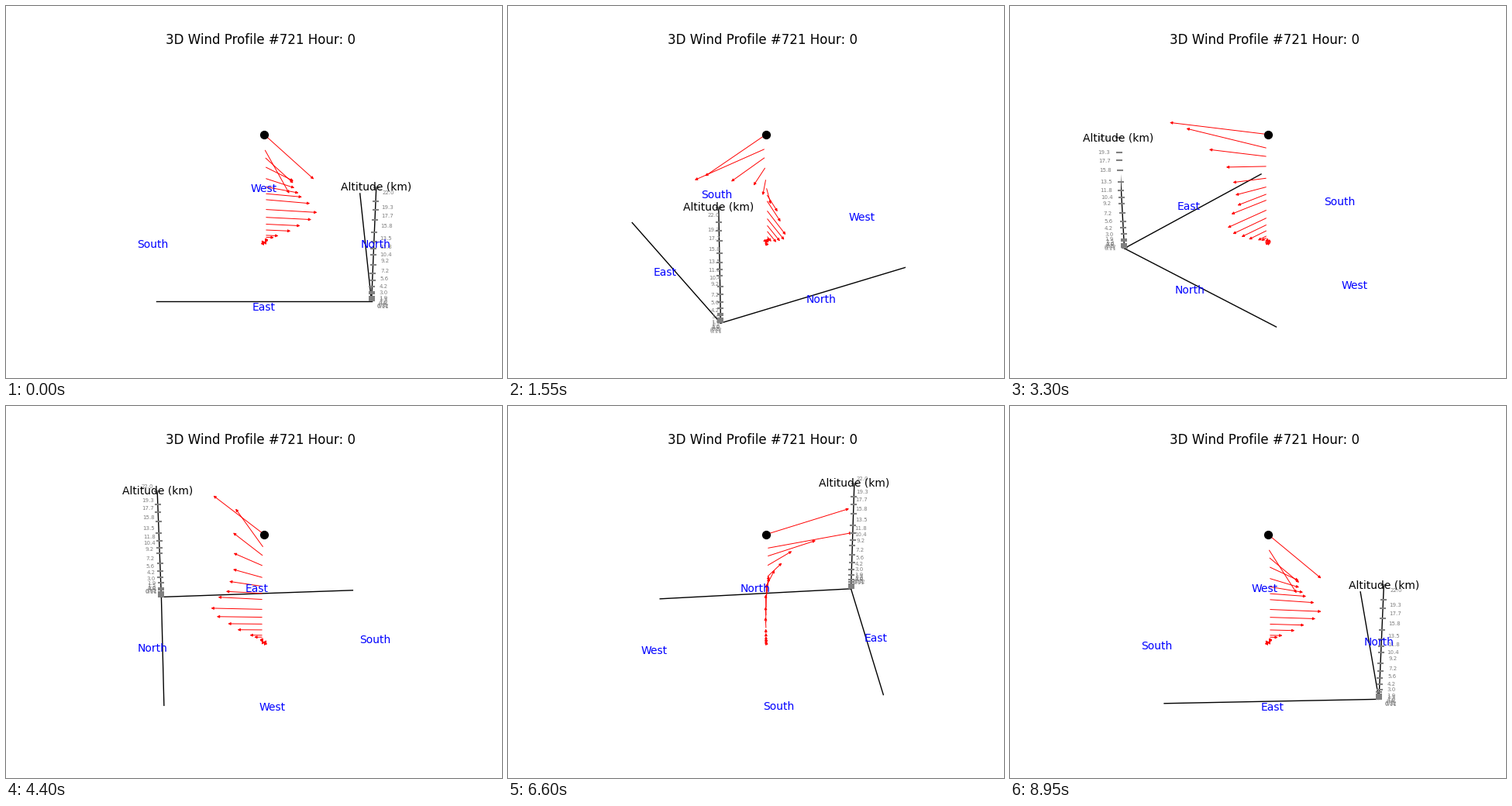
These frames come from a looping animation (640x480 px, 9 s). A matplotlib script:

```python
import numpy as np
import matplotlib.pyplot as plt
from matplotlib.animation import FuncAnimation
from matplotlib.patches import FancyArrowPatch

FRAMES, INTERVAL = 180, 50
ELEV = np.radians(30)
DIST = 10
EDGE = 0.668           # half width of the ground square
LABEL = 1.1 * EDGE     # where labels sit
Z0, KM = -0.414, 0.03727

# altitudes (km) of the standard pressure levels
LEVELS = np.array([0.11, 0.32, 0.5, 0.8, 1.0, 1.5, 1.9, 3.0, 4.2, 5.6,
                   7.2, 9.2, 10.4, 11.8, 13.5, 15.8, 17.7, 19.3, 22.0])
TOP = LEVELS[-1]


def profile(*points):
    """Wind at every level, linear between (km, speed) key points."""
    return np.interp(LEVELS, *zip(*points))


east = profile((0, -0.003), (9.2, 0.053), (10.4, 0.047), (15.8, 0.202),
               (17.7, 0.358), (19.3, 0.593), (22, 0.591))
north = profile((0, -0.03), (3, 0.188), (5.6, 0.322), (7.2, 0.358),
                (9.2, 0.31), (10.4, 0.258), (13.5, 0.206), (17.7, 0.19),
                (19.3, 0.158), (22, 0.308))

COMPASS = {"North": (0, LABEL), "South": (0, -LABEL),
           "East": (LABEL, 0), "West": (-LABEL, 0)}


def project(x, y, km, azim):
    """Perspective view of a point; returns screen x, y."""
    z = Z0 + KM * km
    right = y * np.cos(azim) - x * np.sin(azim)
    near = x * np.cos(azim) + y * np.sin(azim)
    depth = DIST - near * np.cos(ELEV) - z * np.sin(ELEV)
    up = z * np.cos(ELEV) - near * np.sin(ELEV)
    return right / depth, up / depth


fig = plt.figure(figsize=(6.4, 4.8), dpi=100)
ax = fig.add_axes([143.2 / 640, 0.11, 369.6 / 640, 0.77])
ax.set(xlim=(-0.095, 0.09), ylim=(-0.095, 0.09))
ax.axis("off")
ax.set_title("3D Wind Profile #721 Hour: 0")


def label(text, color, size):
    return ax.text(0, 0, text, color=color, fontsize=size,
                   ha="center", va="center", zorder=5)


def arrow():
    patch = FancyArrowPatch((0, 0), (0.01, 0), arrowstyle="-|>",
                            mutation_scale=5, lw=0.7, color="red", zorder=3)
    return ax.add_patch(patch)


# ends of the three axis lines, all starting from the north-east corner
ENDS = [(EDGE, -EDGE, 0), (-EDGE, EDGE, 0), (EDGE, EDGE, TOP)]
axes_lines = [ax.plot([], [], color="black", lw=1, zorder=2)[0] for _ in ENDS]
ticks, = ax.plot([], [], ls="", marker="_", ms=5.6, mew=1.5, color="gray",
                 clip_on=False, zorder=4)
arrows = [arrow() for _ in LEVELS]
heights = [label(str(km), "gray", 5) for km in LEVELS]
compass = [label(name, "blue", 10) for name in COMPASS]
title_z = label("Altitude (km)", "black", 10)
balloon = ax.scatter(*project(0, 0, TOP, 0), s=50, color="black", zorder=4)


def update(i):
    azim = 2 * np.pi * i / FRAMES
    corner = project(EDGE, EDGE, 0, azim)
    for line, end in zip(axes_lines, ENDS):
        line.set_data(*zip(corner, project(*end, azim)))
    ticks.set_data(*project(EDGE, EDGE, LEVELS, azim))
    for km, u, v, patch, text in zip(LEVELS, east, north, arrows, heights):
        patch.set_positions(project(0, 0, km, azim), project(u, v, km, azim))
        text.set_position(project(LABEL, LABEL, km, azim))
    for text, (x, y) in zip(compass, COMPASS.values()):
        text.set_position(project(x, y, 0, azim))
    title_z.set_position(project(EDGE, EDGE, TOP, azim))
    return [*axes_lines, ticks, *arrows, *heights, *compass, title_z]


anim = FuncAnimation(fig, update, frames=FRAMES, interval=INTERVAL,
                     repeat=True, repeat_delay=0)
plt.show()
```
